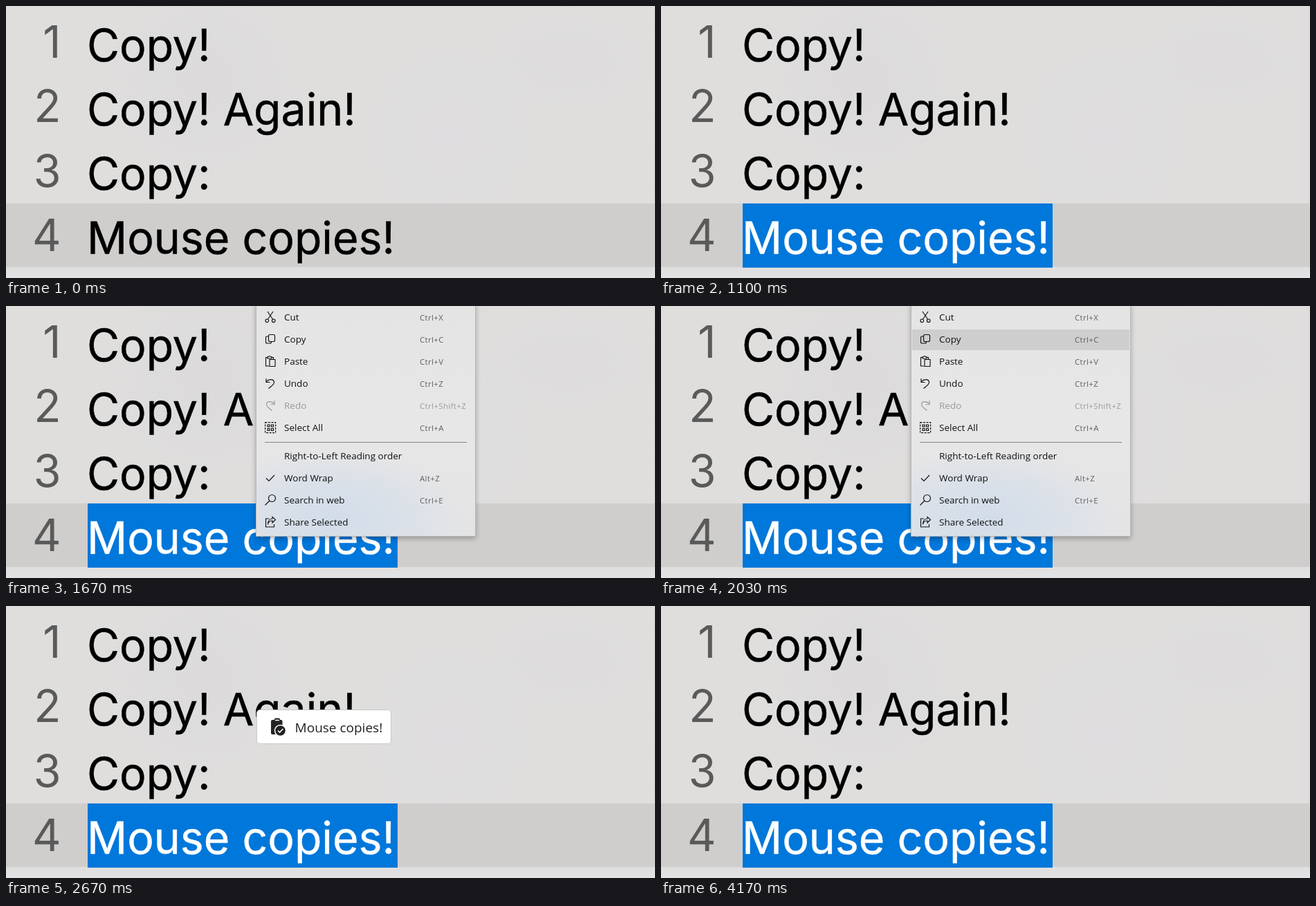
Write an HTML page that moves like this. It is 938 px wide and 394 px high and loops after 4.8 s.

```html
<!DOCTYPE html>
<html lang="en">
<head>
<meta charset="utf-8">
<title>Copy with the mouse</title>
<style>
  html, body { margin: 0; width: 100%; height: 100%; overflow: hidden; }
  body {
    position: relative;
    background:
      linear-gradient(90deg, transparent 935px, #d6d5d5 938px),
      radial-gradient(ellipse 150px 150px at 290px 110px, #dcdadb, transparent),
      radial-gradient(ellipse 130px 80px at 810px 80px, #dddbdc, transparent),
      radial-gradient(ellipse 130px 150px at 640px 190px, #dfdddf, transparent),
      #dfdedd;
  }
  .row { position: absolute; left: 0; right: 0; top: 286px; height: 92px; background: #cfcecd; }
  .below { position: absolute; left: 0; right: 0; top: 378px; bottom: 0; background: linear-gradient(#dfdede, #e4e3e3); }
  .editor { position: absolute; left: 0; top: 0; width: 938px; height: 394px; }
  .editor, .selection { font: 64.4px Inter, sans-serif; }
  .lines { stroke: #000; stroke-width: .5; }
  .numbers { fill: #5a5a5a; text-anchor: end; }

  .caret, .selection, .menu, .hover, .toast { animation: 4.8s linear infinite; }
  .caret { animation-name: caret; animation-timing-function: step-end; }
  .selection {
    position: absolute; left: 118px; top: 286px; width: 448px; height: 93px; background: #0077da;
    animation-name: select; animation-timing-function: step-end;
  }
  .selection text { fill: #fff; stroke: #fff; stroke-width: .5; }

  .menu {
    position: absolute; left: 361px; width: 316px; top: -4px; height: 336px;
    overflow: hidden; border: 1px solid #b9b9b9;
    background:
      radial-gradient(ellipse 190px 105px at 110px 312px, #d2dce9, #d9e0e9 45%, transparent),
      linear-gradient(#e4e4e4, #e8e7e7 50%, #e4e4e5);
    box-shadow: 0 3px 7px rgba(0, 0, 0, .28);
    font: 13.5px/28px "Open Sans", sans-serif; color: #111;
    animation-name: unfold, menuFade;
  }
  .item, .hover { position: absolute; left: 1px; right: 1px; height: 30px; }
  .item span, .item kbd, .item svg { position: absolute; white-space: pre; }
  .item span { left: 39px; }
  .item kbd { left: 235px; font: 11.4px/30px "Open Sans", sans-serif; letter-spacing: .4px; color: #5f5f5f; }
  .item svg { left: 11px; top: 6px; width: 16px; height: 16px; fill: none; stroke: currentColor; stroke-width: 1.15; overflow: visible; }
  .off, .off kbd { color: #9a9a9a; }
  .hover { background: #cecece; animation-name: hover; animation-timing-function: step-end; }
  .line { position: absolute; left: 12px; width: 292px; top: 200px; height: 1px; background: #858585; }

  .toast {
    position: absolute; left: 362px; top: 150px; width: 193px; height: 48px;
    border: 1px solid #c9c9c9; border-radius: 5px; background: #fff;
    animation-name: toast; animation-timing-function: step-end;
  }
  .toast svg { display: block; font: 19px "Open Sans", sans-serif; fill: #222; }

  @keyframes caret {
    0% { opacity: 0; }
    4.1667% { opacity: 1; }
    13.125%, 100% { opacity: 0; }
  }
  @keyframes select {
    0% { clip-path: inset(0 0 0 448px); }
    13.125% { clip-path: inset(0 0 0 426px); }
    13.9%  { clip-path: inset(0 0 0 393px); }
    14.58% { clip-path: inset(0 0 0 355px); }
    15.2%  { clip-path: inset(0 0 0 338px); }
    16.04% { clip-path: inset(0 0 0 297px); }
    16.66% { clip-path: inset(0 0 0 258px); }
    18.12% { clip-path: inset(0 0 0 205px); }
    19.37% { clip-path: inset(0 0 0 134px); }
    20.83% { clip-path: inset(0 0 0 56px); }
    22.91%, 100% { clip-path: inset(0); }
  }
  /* The bottom edge stays put while the top rises. */
  @keyframes unfold {
    0%, 27.5% { top: 165px; height: 167px; animation-timing-function: cubic-bezier(0, 0, 0, 1); }
    33.75%, 100% { top: -4px; height: 336px; }
  }
  @keyframes menuFade {
    0%, 27.5% { opacity: 0; }
    29.2% { opacity: 1; animation-timing-function: step-end; }
    45.833% { opacity: .6; animation-timing-function: step-end; }
    46.875% { opacity: .25; animation-timing-function: step-end; }
    47.916%, 100% { opacity: 0; }
  }
  @keyframes hover {
    0% { opacity: 0; top: 101px; }
    40.208% { opacity: 1; top: 101px; }
    42.291%, 100% { opacity: 1; top: 37px; }
  }
  @keyframes toast {
    0% { opacity: 0; }
    54.166% { opacity: .33; }
    54.79% { opacity: .67; }
    55.62% { opacity: 1; }
    84.791% { opacity: .75; }
    85.416% { opacity: .5; }
    86.041% { opacity: .25; }
    86.874%, 100% { opacity: 0; }
  }
</style>
</head>
<body>
<div class="row"></div>
<div class="below"></div>

<svg class="editor" viewBox="0 0 938 394">
  <g class="numbers">
    <text x="79.500" y="75">1</text>
    <text x="79.500" y="168">2</text>
    <text x="79.500" y="261.500">3</text>
    <text x="79.500" y="355">4</text>
  </g>
  <g class="lines">
    <text x="117" y="79.500">Copy!</text>
    <text x="117" y="173">Copy! Again!</text>
    <text x="117" y="266">Copy:</text>
    <text x="117" y="359">Mouse copies!</text>
  </g>
  <rect class="caret" x="565" y="292" width="2" height="87"/>
</svg>

<svg class="selection"><text x="-1" y="73">Mouse copies!</text></svg>

<div class="menu"><div class="hover"></div><div class="line"></div></div>

<div class="toast">
  <svg width="193" height="48">
    <path d="M22 14h3v-1q0-1.500 1.500-1.500h5q1.500 0 1.500 1.500v1h1.500q2 0 2 2v19H22q-2 0-2-2V16q0-2 2-2z"/>
    <path d="M26 14.500h6" stroke="#fff" stroke-width="1.500"/>
    <circle cx="33.500" cy="29.500" r="8" stroke="#fff" stroke-width="1.500"/>
    <path d="M30 29.500l2.500 2.500 4.800-5" fill="none" stroke="#fff" stroke-width="1.600"/>
    <text x="54.500" y="32">Mouse copies!</text>
  </svg>
</div>

<script>
  const undo = 'M2 1v5.500h5.500M2 6.500C5 1 13.500 1.500 13.500 6.500C13.500 10.500 8.500 12.500 5.500 15.500';
  const icons = {
    Cut: 'M4 0L11.600 11.300M12 0L4.400 11.300M1 13.300a2.300 2.300 0 1 0 4.600 0a2.300 2.300 0 1 0-4.600 0M10.400 13.300a2.300 2.300 0 1 0 4.600 0a2.300 2.300 0 1 0-4.600 0',
    Copy: 'M7.500 1.500h5q2 0 2 2v6q0 2-2 2h-5q-2 0-2-2v-6q0-2 2-2zM5.500 4H3.500q-2 0-2 2v6q0 2 2 2h4q2 0 2-2v-.500',
    Paste: 'M6 15H1.500V2.500H4M10 2.500h2.500V5M4 4V1.500h1.500q1.500-2 3 0H10V4zM7 5.500h8v10H7z',
    Undo: undo,
    Redo: undo,
    'Select All': 'M4 4h3v3H4zM9.500 4h3v3h-3zM4 9.500h3v3H4zM9.500 9.500h3v3h-3z',
    'Word Wrap': 'M2 8.500l4 4L14 4',
    'Search in web': 'M5.500 5.500a5 5 0 1 0 10 0a5 5 0 1 0-10 0M7 9L.500 15.500',
    'Share Selected': 'M6 3H1.500v12h12v-4M4.500 11.500C5 7.500 7.500 6 11 6V9l4.500-4.500L11 .500V3C7 3 4.500 6.500 4.500 11.500z'
  };
  const items = [
    ['Cut', 'Ctrl+X'], ['Copy', 'Ctrl+C'], ['Paste', 'Ctrl+V'], ['Undo', 'Ctrl+Z'],
    ['Redo', 'Ctrl+Shift+Z'], ['Select All', 'Ctrl+A'], ['Right-to-Left Reading order', ''],
    ['Word Wrap', 'Alt+Z'], ['Search in web', 'Ctrl+E'], ['Share Selected', '']
  ];

  function itemMarkup([label, keys], index) {
    const top = 5 + 32 * index + (index > 5 ? 9 : 0);
    const flip = label === 'Redo' ? ' transform="matrix(-1 0 0 1 16 0)"' : '';
    const frame = label === 'Select All'
      ? '<rect x=".6" y=".6" width="15" height="15" stroke-dasharray="3 1.500"/>' : '';
    return `<div class="item ${flip && 'off'}" style="top:${top}px">
      <svg viewBox="0 0 16 16">${frame}<path d="${icons[label] || ''}"${flip}/></svg>
      <span>${label}</span><kbd>${keys}</kbd></div>`;
  }
  document.querySelector('.menu').insertAdjacentHTML('beforeend', items.map(itemMarkup).join(''));
</script>
</body>
</html>
```
